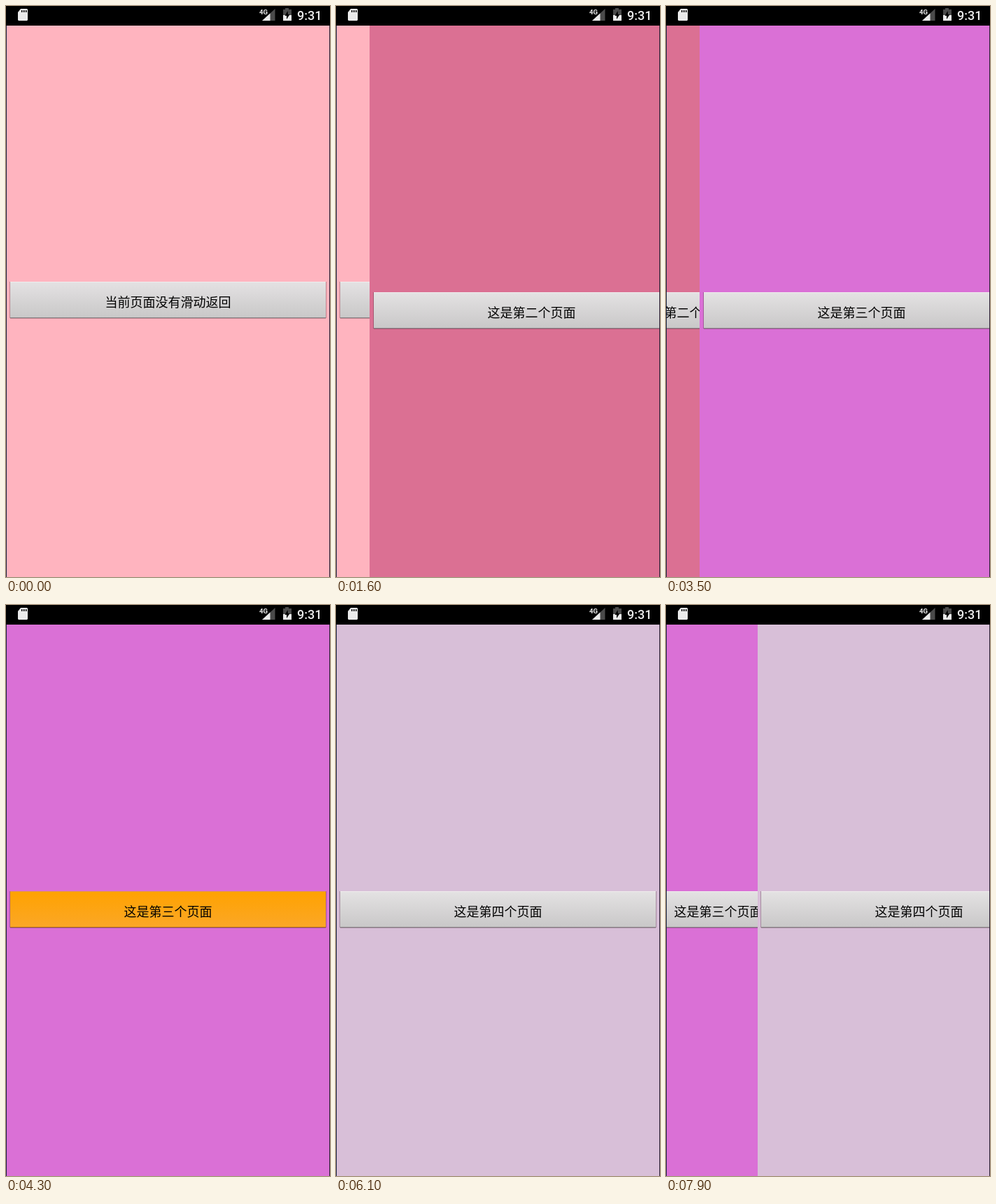
Animation, 463 px wide and 816 px high, one loop 8 s. Source, as an HTML page with a canvas:

```html
<!DOCTYPE html>
<html lang="zh-CN">
<head>
<meta charset="utf-8">
<style>
  html, body { margin: 0; width: 100%; height: 100%; overflow: hidden; background: #000; }
  canvas { display: block; }
</style>
</head>
<body>
<canvas id="stage" width="463" height="816"></canvas>
<script>
const ctx = document.getElementById('stage').getContext('2d');
const W = 463, H = 816, BAR = 28, LOOP = 8000, STEP = 100;

const pages = [
  { color: '#ffb4bf', label: '当前页面没有滑动返回', top: 394, parallax: 0 },
  { color: '#db7093', label: '这是第二个页面', top: 409, parallax: 0.5 },
  { color: '#da70d6', label: '这是第三个页面', top: 409, parallax: 0.5 },
  { color: '#d8bfd8', label: '这是第四个页面', top: 409, parallax: 0.5 },
];
const pushes = [{ at: 1500, from: 202 }, { at: 3400, from: 202 }, { at: 5100, from: 11 }];
const presses = [[1200, 1500], [2800, 3400], [4300, 4900], [5800, 6100]];
const drag = { at: 7600, step: 32.5, parallax: 0.473 };

function rect(color, x, y, w, h) {
  ctx.fillStyle = color;
  ctx.fillRect(x, y, w, h);
}

function poly(color, ...points) {
  ctx.fillStyle = color;
  ctx.beginPath();
  for (let i = 0; i < points.length; i += 2) ctx.lineTo(points[i], points[i + 1]);
  ctx.fill();
}

function text(str, x, y, font, color, align) {
  ctx.font = font;
  ctx.fillStyle = color;
  ctx.textAlign = align;
  ctx.fillText(str, x, y);
}

function button(y, pressed) {
  const [light, dark, edge, bottom] = pressed
    ? ['#ffa200', '#fba726', '#e59a3c', '#a8641c']
    : ['#e4e2e3', '#c9c8c8', '#eeecec', '#858083'];
  const fill = ctx.createLinearGradient(0, y, 0, y + 51);
  fill.addColorStop(0, light);
  fill.addColorStop(1, dark);
  rect('rgba(70,40,50,.35)', 5, y, 453, 52);
  rect('rgba(70,40,50,.3)', 6, y + 52, 451, 1);
  rect(fill, 6, y, 451, 51);
  rect(edge, 6, y, 451, 1);
  rect(bottom, 6, y + 51, 451, 1);
}

function drawPage({ color, label, top }, clipX, shift, pressed) {
  ctx.save();
  ctx.beginPath();
  ctx.rect(clipX, BAR, W - clipX, H - BAR);
  ctx.clip();
  rect(color, clipX, BAR, W - clipX, H - BAR);
  ctx.translate(Math.round(shift), 0);
  button(top, pressed);
  text(label, 231.5, top + 35.5, '18px "Noto Sans CJK SC", "Noto Sans CJK", sans-serif', '#000', 'center');
  ctx.restore();
}

function statusBar() {
  const white = '#ebebeb', gray = '#4a4a4a';
  rect('#000', 0, 0, W, BAR);
  // memory card
  poly(white, 21, 4, 30, 4, 31, 5, 31, 20, 30, 21, 18, 21, 17, 20, 17, 9);
  for (const x of [22, 25, 28]) rect('#000', x, 6, 1.5, 3);
  // signal
  poly(gray, 384.5, 4, 384.5, 21, 366, 21);
  poly(white, 377.5, 10.5, 377.5, 21, 366, 21);
  rect('#000', 361, 2, 13, 11);
  text('4G', 362, 12, 'bold 9.5px "Roboto", sans-serif', white, 'left');
  // battery
  rect(gray, 399, 3, 5, 3);
  rect(gray, 396, 5, 12, 8);
  rect(white, 396, 13, 12, 8);
  poly('#000', 402.5, 7, 398.5, 14, 401, 14, 401, 19, 405.5, 12, 403, 12);
  text('9:31', 451.5, 19.5, '500 18px "Roboto", sans-serif', white, 'right');
}

function draw(t) {
  const top = pushes.filter(p => t >= p.at).length;
  let offset = 0, parallax = 0;
  if (top) {
    const { at, from } = pushes[top - 1];
    const left = from * 0.2375 ** Math.floor((t - at) / STEP);
    offset = left < 5 ? 0 : Math.round(left);
    parallax = pages[top - 1].parallax;
  }
  if (t >= drag.at) {
    offset = Math.round(drag.step * (Math.floor((t - drag.at) / STEP) + 1));
    parallax = drag.parallax;
  }
  const pressed = presses.some(([down, up]) => t >= down && t < up);

  if (offset) drawPage(pages[top - 1], 0, -parallax * (W - 1 - offset), false);
  drawPage(pages[top], offset && offset + 1 - (offset < 100), offset, pressed);
  rect('#17233f', 0, BAR, 1, H - BAR);
  rect('#2b2035', W - 1, BAR, 1, H - BAR);
  statusBar();
}

const start = performance.now();
function frame() {
  draw((performance.now() - start) % LOOP);
  requestAnimationFrame(frame);
}
frame();
</script>
</body>
</html>
```
